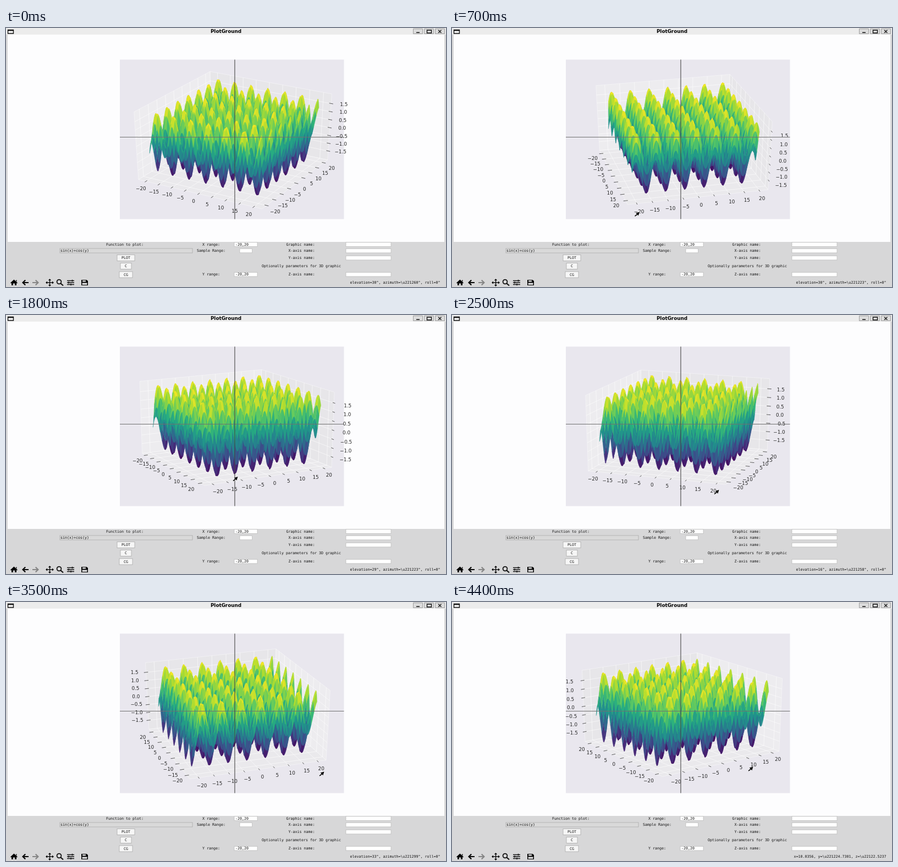
Recreate the animation shown at these times as an HTML page with a canvas. Size 800x471 px, loop 4500 ms.

```html
<!DOCTYPE html>
<html lang="en">
<head>
<meta charset="utf-8">
<title>PlotGround</title>
<style>
html, body { margin: 0; width: 800px; height: 471px; overflow: hidden; background: #fdfdfe; }
svg, canvas { position: absolute; left: 0; top: 0; display: block; }
.ui { font: 6.65px "DejaVu Sans Mono", monospace; fill: #111; white-space: pre; }
.title { font: bold 8.8px "DejaVu Sans", sans-serif; fill: #000; }
.field { fill: #fff; stroke: #bdbdbd; stroke-width: .8; }
.button { fill: #f6f6f6; stroke: #aaa; stroke-width: .8; }
.line { fill: none; stroke: #111; stroke-width: 1.4; }
</style>
</head>
<body>
<svg width="800" height="471">
  <path fill="#d7d7d8" d="M0 0H800V471H0ZM3 12V389H797V12Z" fill-rule="evenodd"/>
  <path fill="#ececec" d="M0 0H800V12H0Z"/>
  <path class="line" stroke-width="1" d="M3.5 3.5H13.5V10H3.5ZM3.5 4.5H13.5"/>
  <text class="title" x="400" y="8.6" text-anchor="middle">PlotGround</text>
  <g fill="#dcdcdc" stroke="#8c8c8c" stroke-width=".8">
    <path d="M740.5 1.5h17v9h-17zM760.5 1.5h17v9h-17zM780.5 1.5h17v9h-17z"/>
  </g>
  <path class="line" d="M746 8.3h6M765.5 4h8v5h-8zM786 3.7l5.5 5M791.5 3.7l-5.5 5"/>
  <g id="form"></g>

  <path d="M8 463.5L14.5 457.5L21 463.5L20 464.4L19 463.6V468H16V464.5H13V468H10V463.6L9 464.4ZM18 458.5H19.5V461.5L18 460Z"/>
  <path id="arrow" d="M29 463L34.5 457.8L36 459.2L33.2 462H41V464H33.2L36 466.8L34.5 468.2Z"/>
  <path fill="#858585" d="M60 463L54.5 457.8L53 459.2L55.8 462H48V464H55.8L53 466.8L54.5 468.2Z"/>
  <path class="line" d="M73.5 463H85.5M79.5 457V469"/>
  <path d="M72 463l3-2.6v5.2zM87 463l-3-2.6v5.2zM79.5 456l2.6 3h-5.2zM79.5 470l2.6-3h-5.2z"/>
  <circle class="line" cx="96.5" cy="461.5" r="3.9" style="stroke-width:1.8"/>
  <path class="line" d="M99.5 464.5L104 468.5" style="stroke-width:2.2"/>
  <path class="line" d="M111 459.5H124M111 463H124M111 466.5H124M120.5 457.8v3.4M114 461.3v3.4M118 464.8v3.4"/>
  <path fill-rule="evenodd" d="M137 458H146.5L149 460V468H137ZM139 459V461.5H145V459ZM138.5 463.5V467H147.5V463.5Z"/>
  <text class="ui" id="status" x="789.5" y="465" text-anchor="end"></text>
</svg>
<canvas id="plot" width="800" height="471"></canvas>

<script>
// ---- form below the plot ----
const form = document.getElementById('form');
function add(tag, attrs, text = '') {
  const node = document.createElementNS('http://www.w3.org/2000/svg', tag);
  for (const name in attrs) node.setAttribute(name, attrs[name]);
  node.textContent = text;
  form.append(node);
}
const label = (x, y, text, anchor = 'start') =>
  add('text', { class: 'ui', x, y: y + 2.2, 'text-anchor': anchor }, text);
const box = (cls, x, y, width, height) => add('rect', { class: cls, x, y, width, height });

label(182, 393.5, 'Function to plot:');
label(357, 393.5, 'X range:');
label(347, 405, 'Sample Range:');
label(357, 448, 'Y range:');
label(465, 433, 'Optionally parameters for 3D graphic');
[['Graphic', 393.5], ['X-axis', 405], ['Y-axis', 418], ['Z-axis', 448]].forEach(([name, y]) => {
  label(561.5, y, name + ' name:', 'end');
  box('field', 618, y - 3.7, 82, 7.6);
});
add('rect', { x: 98, y: 401, width: 241, height: 8, fill: '#d9d9d9', stroke: '#aaa', 'stroke-width': .8 });
label(99, 405, 'sin(x)+cos(y)');
box('field', 425, 401.3, 22.5, 7.5);
for (const y of [393.5, 448]) {
  box('field', 415, y - 3.7, 42, 7.6);
  label(417, y, '-20,20');
}
[['PLOT', 418, 32], ['C', 433, 20], ['CG', 448.5, 24]].forEach(([text, y, w]) => {
  box('button', 218 - w / 2, y - 5.5, w, 11);
  label(218, y, text, 'middle');
});

// ---- motion: time, azimuth, elevation, pointer x, pointer y ----
const keys = [
  [0, -60, 30, 440, 336], [100, -60, 30, 440, 336], [500, -23, 30, 360, 338],
  [700, -14.3, 30.5, 336.5, 338.5], [1000, -12, 42, 324, 350], [1300, -13, 34, 340, 344],
  [1600, -23, 29, 395, 316], [1800, -28.5, 17.5, 417, 298], [2100, -45, 14.5, 442, 302],
  [2300, -58, 16, 461, 310], [2500, -70, 18, 481, 322], [2900, -77, 31, 515, 330],
  [3100, -81, 36, 530, 326.5], [3300, -99, 33, 552, 319], [3500, -109.5, 28, 574, 312.5],
  [3900, -122, 22, 604, 303], [4100, -125, 21, 604, 303], [4400, -125, 21, 543, 303.5]
];
function stateAt(t) {
  const i = keys.findIndex(k => k[0] >= t);
  if (i <= 0) return keys[0];
  const a = keys[i - 1], b = keys[i], f = (t - a[0]) / (b[0] - a[0]);
  return a.map((v, j) => v + (b[j] - v) * f);
}

// ---- surface z = sin x + cos y, in cells with finely sampled edges ----
const viridis = [[68, 1, 84], [71, 45, 123], [59, 82, 139], [44, 114, 142], [33, 145, 140],
  [40, 174, 128], [94, 201, 98], [173, 220, 48], [253, 231, 37]];
function colour(z) {
  const p = Math.min(7.999, Math.max(0, (z / 3.9 + .5) * 8)), i = Math.floor(p);
  return `rgb(${viridis[i].map((v, j) => Math.round(v + (viridis[i + 1][j] - v) * (p - i)))})`;
}
const N = 50, SUB = 4, STEP = 40 / N, cells = [];
for (let i = 0; i < N; i++) for (let j = 0; j < N; j++) {
  const points = [];
  let sum = 0;
  for (let n = 0; n < 4 * SUB; n++) {
    const f = n % SUB / SUB;
    const [u, v] = [[f, 0], [1, f], [1 - f, 1], [0, 1 - f]][Math.floor(n / SUB)];
    const x = -20 + (i + u) * STEP, y = -20 + (j + v) * STEP, z = Math.sin(x) + Math.cos(y);
    points.push([x / 44, y / 44, z / 4]);
    sum += z;
  }
  cells.push({ points, fill: colour(sum / points.length) });
}

// ---- drawing ----
const ctx = document.getElementById('plot').getContext('2d');
const status = document.getElementById('status');
const EDGE = .521, LABEL = .591, TICK = .016;
const ticksXY = [-20, -15, -10, -5, 0, 5, 10, 15, 20];
const ticksZ = [-1.5, -1, -.5, 0, .5, 1, 1.5];
let project;

function setView(az, el) {
  const rad = Math.PI / 180;
  const ca = Math.cos(az * rad), sa = Math.sin(az * rad);
  const ce = Math.cos(el * rad), se = Math.sin(el * rad);
  project = ([x, y, z]) => {
    const X = x * 1.143, Y = y * 1.143, Z = z * .857;
    const r = ca * X + sa * Y, depth = ce * r + se * Z, k = 10 / (10 - depth);
    return [416 + 216 * k * (ca * Y - sa * X), 198 - 157 * k * (ce * Z - se * r), depth];
  };
}
function trace(points) {
  ctx.beginPath();
  for (const p of points) ctx.lineTo(...project(p).slice(0, 2));
}
function line(points, style, width) {
  trace(points);
  ctx.strokeStyle = style;
  ctx.lineWidth = width;
  ctx.stroke();
}
function pane(points, fill) {
  trace(points);
  ctx.closePath();
  ctx.fillStyle = fill;
  ctx.fill();
  line([...points, points[0]], 'rgba(255,255,255,.5)', .8);
}
function tick(from, to, at, text, dy = 0) {
  line([from, to], '#333', .8);
  const [x, y] = project(at);
  ctx.fillStyle = '#262626';
  ctx.fillText(text.replace('-', '\u2212'), x, y + dy);
}

function drawAxes(az) {
  const near = az > -90 ? 1 : -1, e = EDGE, xf = -near * e, xn = near * e;
  const grid = points => line(points, 'rgba(255,255,255,.7)', .8);
  pane([[xf, -e, -e], [xf, e, -e], [xf, e, e], [xf, -e, e]], 'rgba(242,242,242,.5)');
  pane([[-e, e, -e], [e, e, -e], [e, e, e], [-e, e, e]], 'rgba(230,230,230,.5)');
  pane([[-e, -e, -e], [e, -e, -e], [e, e, -e], [-e, e, -e]], 'rgba(236,236,236,.5)');
  for (const v of ticksXY) {
    const p = v / 44;
    grid([[p, -e, -e], [p, e, -e], [p, e, e]]);
    grid([[xn, p, -e], [xf, p, -e], [xf, p, e]]);
  }
  for (const v of ticksZ) grid([[xf, -e, v / 4], [xf, e, v / 4], [xn, e, v / 4]]);
  const lo = e - TICK, hi = e + TICK;
  for (const v of ticksXY) {
    const p = v / 44;
    tick([p, -lo, -e], [p, -hi, -e], [p, -LABEL, -LABEL], String(v));
    tick([near * lo, p, -e], [near * hi, p, -e], [near * LABEL, p, -LABEL], String(v));
  }
  for (const v of ticksZ) {
    const p = v / 4;
    tick([near * lo, e, p], [near * hi, e, p], [near * LABEL, LABEL, p], v.toFixed(1), 4);
  }
}

function drawSurface() {
  const shapes = cells.map(({ points, fill }) => {
    const flat = points.map(project);
    return { flat, fill, depth: flat.reduce((s, p) => s + p[2], 0) };
  }).sort((a, b) => a.depth - b.depth);
  ctx.lineWidth = .4;
  for (const { flat, fill } of shapes) {
    ctx.beginPath();
    for (const [x, y] of flat) ctx.lineTo(x, y);
    ctx.closePath();
    ctx.fillStyle = ctx.strokeStyle = fill;
    ctx.fill();
    ctx.stroke();
  }
}

function drawPointer(x, y) {
  ctx.save();
  ctx.translate(x, y);
  const arrow = new Path2D('M4.5 -4L-2.5 -2L-.3 -.2L-4.5 3L-3.6 4.2L.9 1.1L2.3 3Z');
  ctx.strokeStyle = '#fff';
  ctx.lineWidth = 1;
  ctx.stroke(arrow);
  ctx.fillStyle = '#000';
  ctx.fill(arrow);
  ctx.restore();
}

const signed = (v, digits) => (v < 0 ? '\\u2212' : '') + Math.abs(v).toFixed(digits);
function statusText(t, x) {
  if (t === 100 || t > 4100) {
    const dx = x - 543;
    return `x=${signed(10.0356 + dx * .21, 4)}, y=${signed(-24.7301 + dx * .006, 4)}, z=${signed(-2.5237, 4)}`;
  }
  const [, az, el] = stateAt(t - 200);
  return `elevation=${Math.round(el)}°, azimuth=${signed(az, 0)}°, roll=0°`;
}

function draw(t) {
  const [, az, el, x, y] = stateAt(t);
  setView(az, el);
  ctx.clearRect(0, 0, 800, 471);
  ctx.fillStyle = '#e9e7ee';
  ctx.fillRect(207, 57.5, 407.5, 290);
  ctx.font = '8.8px "DejaVu Sans", sans-serif';
  ctx.textAlign = 'center';
  ctx.textBaseline = 'middle';
  drawAxes(az);
  drawSurface();
  ctx.fillStyle = '#707070';
  ctx.fillRect(207, 198, 407.5, 1);
  ctx.fillStyle = '#444';
  ctx.fillRect(415.4, 57.5, 1.1, 290);
  if (t > 0) drawPointer(x, y);
  status.textContent = statusText(t, x);
}

let shown = -1;
function frame(now) {
  const t = Math.floor(now % 4500 / 100) * 100;
  if (t !== shown) draw(shown = t);
  requestAnimationFrame(frame);
}
draw(0);
requestAnimationFrame(frame);
</script>
</body>
</html>
```
